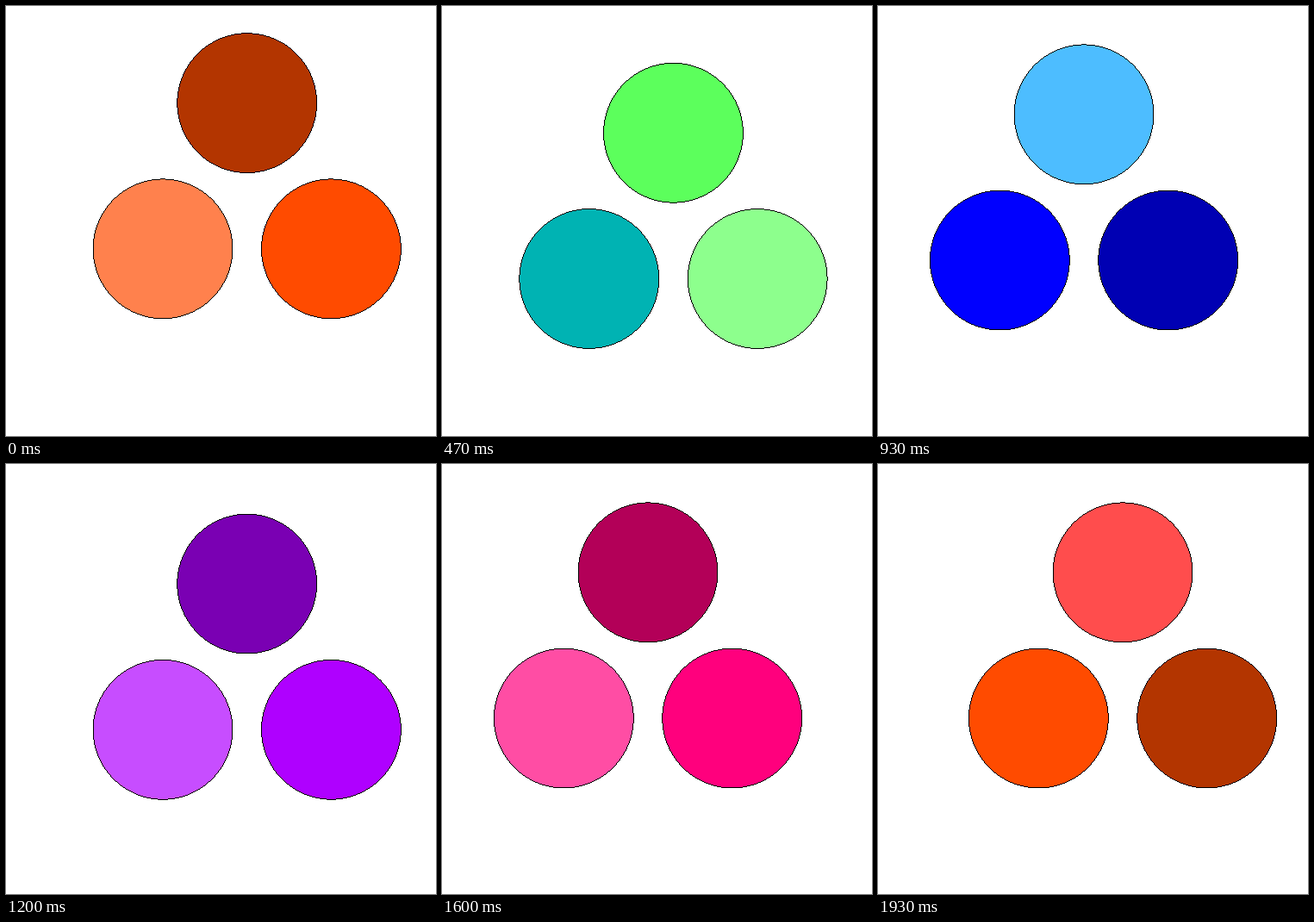
Recreate the animation shown at these times as an HTML page with a canvas. Size 499 by 499 pixels, loop 1.99 s.

```html
<!DOCTYPE html>
<html lang="en">
<head>
<meta charset="utf-8">
<title>Circling discs</title>
<style>
html, body { margin: 0; width: 100%; height: 100%; overflow: hidden; background: #fff; }
canvas { display: block; width: 499px; height: 499px; }
</style>
</head>
<body>
<canvas id="stage" width="499" height="499"></canvas>
<script>
const ctx = document.getElementById('stage').getContext('2d');
const LOOP = 1990, STEPS = 30;
const RADIUS = 80.9, ORBIT = 22.5;
const CENTER = { x: 261.5, y: 125.85 };
// Offsets of the top, right and left disc
const HALF = 97.7, DROP = HALF * Math.sqrt(3);
const SPOTS = [[0, 0], [HALF, DROP], [-HALF, DROP]];
const HUES = [
  [255, 75, 0], [255, 200, 0], [92, 255, 92], [0, 255, 255], [0, 160, 255],
  [0, 0, 255], [175, 0, 255], [255, 0, 255], [255, 0, 125], [255, 0, 0]
];
const SHADES = [v => v * 0.7, v => v, v => v + (255 - v) * 0.3];

function colorAt(n) {
  n %= STEPS;
  const rgb = HUES[Math.floor(n / 3)].map(SHADES[n % 3]).map(Math.round);
  return `rgb(${rgb.join(',')})`;
}

// Calls plot(line, near, far, distance) for each pixel line that crosses the disc
function scan(along, across, plot) {
  const last = Math.floor(along + RADIUS);
  for (let p = Math.floor(along - RADIUS); p <= last; p++) {
    const d = Math.min(Math.abs(p + 0.5 - along), RADIUS);
    const w = Math.sqrt(RADIUS * RADIUS - d * d);
    plot(p, Math.floor(across - w), Math.floor(across + w), d);
  }
}

// Disc with a crisp one-pixel outline
function disc(x, y, color) {
  const dot = (px, py) => ctx.fillRect(px, py, 1, 1);
  const steep = RADIUS * Math.SQRT1_2 + 0.5;
  ctx.fillStyle = color;
  scan(y, x, (row, a, b) => ctx.fillRect(a, row, b - a + 1, 1));
  ctx.fillStyle = '#000';
  scan(y, x, (row, a, b, d) => {
    if (d <= steep) { dot(a, row); dot(b, row); }
  });
  scan(x, y, (col, a, b, d) => {
    if (d <= steep) { dot(col, a); dot(col, b); }
  });
}

const stepStart = i => Math.round(i * 20 / 3) * 10;

function stepAt(time) {
  let i = STEPS - 1;
  while (i > 0 && stepStart(i) > time) i--;
  return i;
}

function draw(step) {
  const angle = (step + 1) * Math.PI / 5;
  const x = CENTER.x + ORBIT * Math.cos(angle);
  const y = CENTER.y - ORBIT * Math.sin(angle);
  ctx.fillStyle = '#fff';
  ctx.fillRect(0, 0, 499, 499);
  SPOTS.forEach(([dx, dy], i) => disc(x + dx, y + dy, colorAt(step + i)));
}

function tick() {
  draw(stepAt(performance.now() % LOOP));
  requestAnimationFrame(tick);
}
tick();
</script>
</body>
</html>
```
